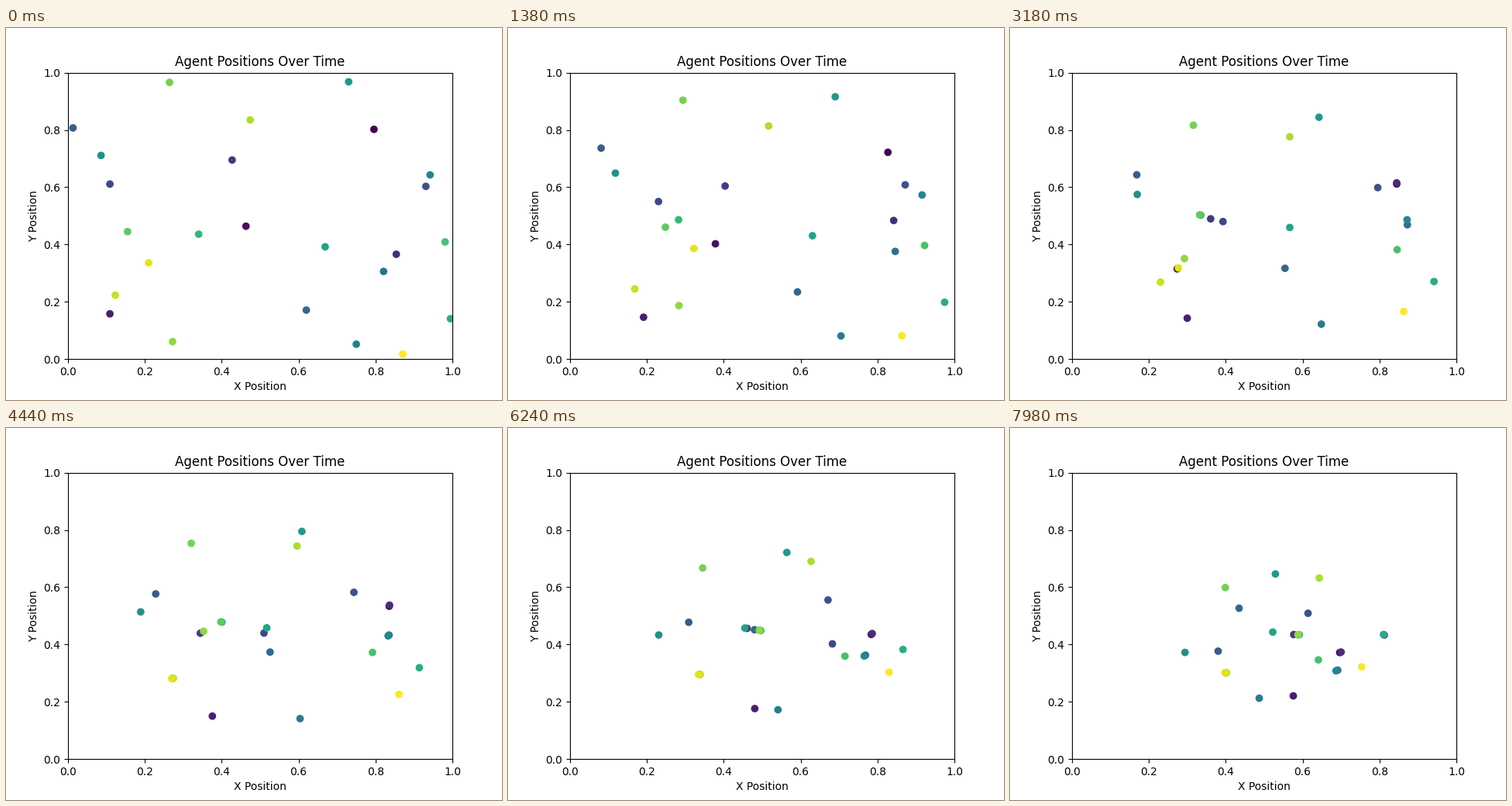
Write a matplotlib script that moves like this. It is 640x480 px and loops after 8000 ms.

```python
import numpy as np
import matplotlib.pyplot as plt
from matplotlib.animation import FuncAnimation

STEP_MS, FRAME_MS, LOOP_MS = 60, 40, 8000

# Each agent: start x, start y, the agent it chases, pace (axes per 100 steps).
# All later positions follow from the chase rule.
AGENTS = np.array([
    (0.796, 0.802, 17, 0.374), (0.463, 0.464, 22, 0.455),
    (0.109, 0.158, 24, 0.362), (0.854, 0.366, 0, 0.515),
    (0.427, 0.695, 20, 0.408), (0.109, 0.611, 15, 0.590),
    (0.931, 0.603, 4, 0.258), (0.013, 0.807, 10, 0.426),
    (0.620, 0.171, 19, 0.302), (0.821, 0.306, 11, 0.323),
    (0.750, 0.052, 23, 0.233), (0.942, 0.643, 10, 0.325),
    (0.086, 0.711, 23, 0.304), (0.730, 0.968, 23, 0.286),
    (0.669, 0.392, 4, 0.237), (0.995, 0.141, 13, 0.265),
    (0.340, 0.436, 5, 0.333), (0.981, 0.409, 22, 0.260),
    (0.155, 0.445, 16, 0.417), (0.264, 0.966, 4, 0.301),
    (0.272, 0.061, 16, 0.550), (0.474, 0.835, 11, 0.208),
    (0.123, 0.223, 11, 0.220), (0.210, 0.336, 1, 0.535),
    (0.871, 0.017, 9, 0.283),
])
start = AGENTS[:, :2]
prey = AGENTS[:, 2].astype(int)
speed = AGENTS[:, 3] / 100


def chase(pos):
    """Move every agent straight at its prey, never past it."""
    gap = pos[prey] - pos
    dist = np.maximum(np.hypot(*gap.T), 1e-12)
    return pos + gap * np.minimum(speed / dist, 1)[:, None]


track = [start]
while len(track) * STEP_MS < LOOP_MS:
    track.append(chase(track[-1]))

fig, ax = plt.subplots(figsize=(6.4, 4.8), dpi=100)
dots = ax.scatter(*start.T, c=np.arange(len(start)), cmap="viridis")
ax.set(xlim=(0, 1), ylim=(0, 1), xlabel="X Position", ylabel="Y Position",
       title="Agent Positions Over Time")


def update(frame):
    # sample at the middle of the frame so steps change on time
    dots.set_offsets(track[(frame * FRAME_MS + FRAME_MS // 2) // STEP_MS])
    return (dots,)


anim = FuncAnimation(fig, update, frames=LOOP_MS // FRAME_MS,
                     interval=FRAME_MS, repeat=True, repeat_delay=0)
plt.show()
```
